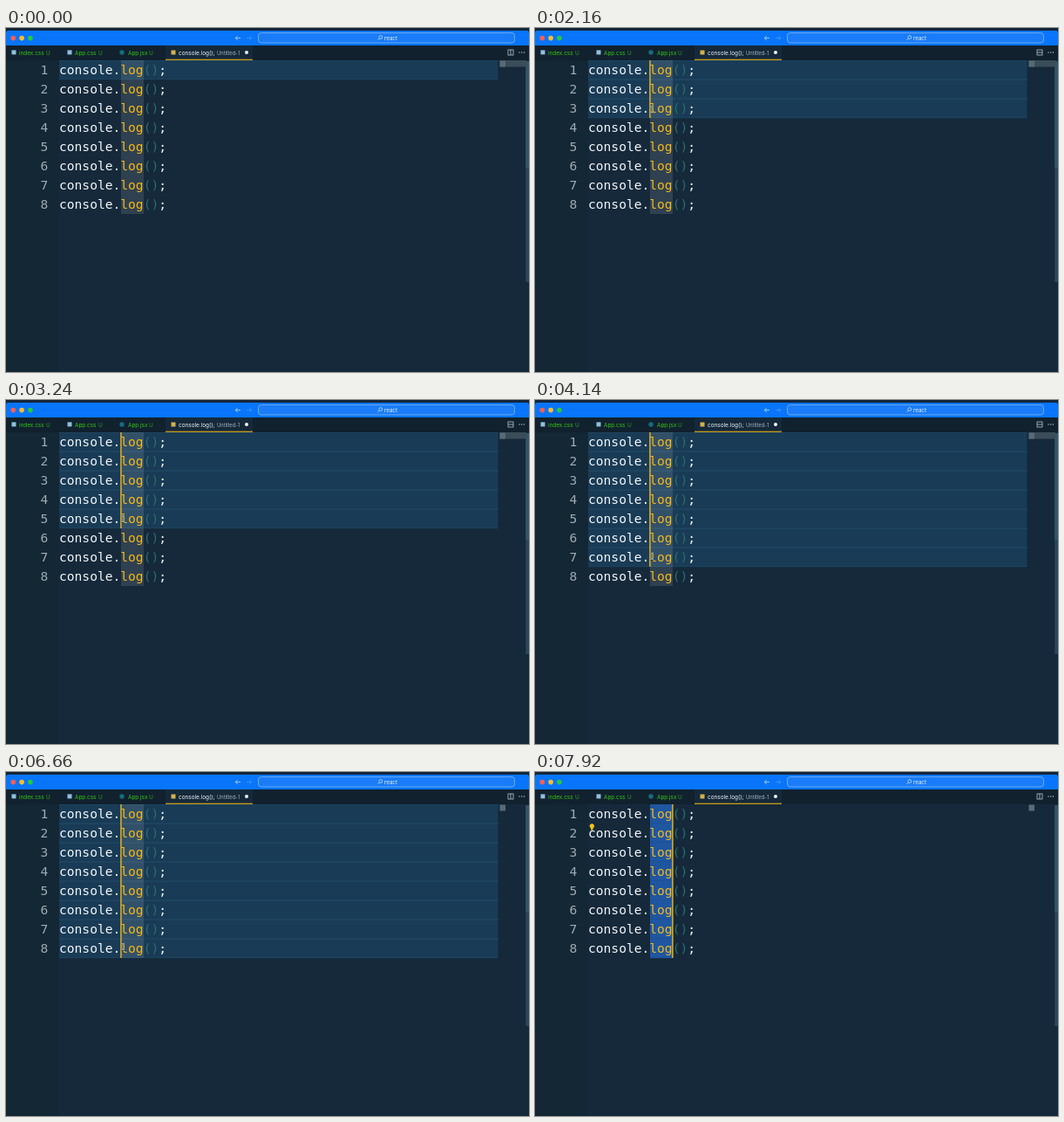
Animation of 600 by 394 pixels, one loop 8000 ms. Source, as an HTML page:

```html
<!DOCTYPE html>
<html lang="en">
<head>
<meta charset="utf-8">
<title>Multiple cursors</title>
<style>
html, body { margin: 0; width: 100%; height: 100%; overflow: hidden; background: #15293b; }
svg { display: block; width: 100vw; height: 100vh; }
text { white-space: pre; }
.code { font: 14.6px "DejaVu Sans Mono", monospace; fill: #f4f7f8; }
.ui { font: 6.4px Inter, sans-serif; }
</style>
</head>
<body>
<svg id="stage" viewBox="0 0 600 394"></svg>
<script>
const LOOP = 8000, ROWS = 8, TOP = 37, ROW = 22;
const TEXT_X = 61, WORD_X = 132, WORD_END = 158;
const CLICKS = [1300, 1640, 2110, 2700, 3180, 3650, 4130, 4600];
const MOUSE_IN = 900, ALT_DOWN = 900, ALT_UP = 5400;
const SLIDER_OUT = 4300, SELECT = 7460, BULB = 7700;
const NS = 'http://www.w3.org/2000/svg';
const stage = document.getElementById('stage');

function add(tag, attrs, parent = stage) {
  const el = document.createElementNS(NS, tag);
  for (const key in attrs) el.setAttribute(key, attrs[key]);
  parent.appendChild(el);
  return el;
}
const rect = (x, y, width, height, fill, more, parent) =>
  add('rect', { x, y, width, height, fill, ...more }, parent);
const dot = (cx, cy, r, fill, parent) => add('circle', { cx, cy, r, fill }, parent);
const line = (d, stroke, width = 0.8, parent) =>
  add('path', { d, stroke, 'stroke-width': width, fill: 'none' }, parent);
function label(x, y, str, fill, more) {
  add('text', { x, y, fill, class: 'ui', ...more }).textContent = str;
}
const show = (el, on) => el.setAttribute('visibility', on ? 'visible' : 'hidden');
const clamp = v => Math.max(0, Math.min(1, v));
const ease = v => { v = clamp(v); return v * v * (3 - 2 * v); };

function drawTitleBar() {
  rect(0, 0, 600, 8, '#142639');
  rect(0, 3, 600, 17.5, '#0875fb', { rx: 2.5 });
  rect(0, 10, 600, 10, '#0875fb');
  ['#ff5f57', '#febc2e', '#28c840'].forEach((c, i) => dot(8.3 + i * 9.8, 11.6, 2.8, c));
  line('M269 11.6H263.3M265.8 9.1L263.3 11.6L265.8 14.1', '#c3dcff');
  line('M276 11.6H281.7M279.2 9.1L281.7 11.6L279.2 14.1', '#4c98f8');
  rect(289.5, 5.6, 294, 11.4, '#1a7cf8', { rx: 3, stroke: '#82b7fb', 'stroke-width': 0.8 });
  add('circle', { cx: 429.8, cy: 10.6, r: 1.9, fill: 'none', stroke: '#d9e9ff', 'stroke-width': 0.7 });
  line('M428.4 12L426.4 14', '#d9e9ff', 0.7);
  label(434, 13.5, 'react', '#eef5ff', { style: 'font-size:6.2px' });
}

function drawTabs() {
  rect(0, 20, 600, 17, '#11212e');
  rect(183, 20, 100, 17, '#15293b');
  rect(183, 35.7, 100, 1.2, '#d9a514');
  const tabs = [[15, 46, 'index.css'], [79, 106, 'App.css'], [140, 164, 'App.jsx']];
  for (const [x, mark, name] of tabs) {
    label(x, 30.6, name, '#35c914');
    label(mark, 30.6, 'U', '#2ba51a');
  }
  rect(6.5, 25.4, 5, 5, '#8fbfdd');
  rect(70.5, 25.4, 5, 5, '#8fbfdd');
  dot(133, 28, 2.7, '#176b80');
  rect(189.5, 25.5, 5, 5, '#d5b04b');
  label(198, 30.6, 'console.log();', '#f2f5f7');
  label(242, 30.6, 'Untitled-1', '#a7b3bc', { style: 'font-size:5.8px' });
  dot(276, 28, 2, '#f4f6f7');
  [589, 591.7, 594.4].forEach(x => dot(x, 28, 0.7, '#b8c3ca'));
}

function drawCode() {
  const parts = [['console.', '#f4f7f8'], ['log', '#f6b91a'], ['()', '#2a6d70'], [';', '#f4f7f8']];
  for (let i = 0; i < ROWS; i++) {
    const y = TOP + 16.2 + i * ROW;
    add('text', { x: 48.3, y, class: 'code', 'text-anchor': 'end', style: 'fill:#a0abb1' })
      .textContent = i + 1;
    const t = add('text', { x: TEXT_X, y, class: 'code' });
    for (const [str, color] of parts) {
      add('tspan', { style: 'fill:' + color }, t).textContent = str;
    }
  }
}

rect(0, 0, 600, 394, '#15293b');
rect(0, TOP, 61, 357, '#132735');
drawTitleBar();
drawTabs();

const active = [];
for (let i = 0; i < ROWS; i++) {
  const g = add('g', {}), y = TOP + i * ROW;
  rect(TEXT_X, y, 503.5, ROW, '#193b56', {}, g);
  line(`M${TEXT_X} ${y + 0.5}H564.5M${TEXT_X} ${y + ROW - 0.3}H564.5`, '#1f4662', 0.9, g);
  active.push(g);
}

const wordMarks = rect(WORD_X, TOP, WORD_END - WORD_X, ROWS * ROW, '#fff', { 'fill-opacity': 0.11 });
const selection = add('g', {});
for (let i = 0; i < ROWS; i++) {
  rect(WORD_X, TOP + i * ROW, WORD_END - WORD_X, ROW, '#1f56a0', {}, selection);
  line(`M${WORD_X} ${TOP + (i + 1) * ROW}H${WORD_END}`, '#1b4a88', 0.8, selection);
}

drawCode();

const carets = [];
for (let i = 0; i < ROWS; i++) {
  carets.push(rect(WORD_X - 0.8, TOP + i * ROW, 1.4, ROW, '#efb71c'));
}

const bulb = add('g', {});
dot(65.3, 61.8, 2.6, '#f8c21c', bulb);
rect(64.1, 63.6, 2.4, 3, '#f8c21c', {}, bulb);

const splitIcon = add('g', {});
rect(576, 25, 6, 6, 'none', { stroke: '#b8c3ca', 'stroke-width': 0.8 }, splitIcon);
const splitRight = line('M579 25V31', '#b8c3ca', 0.8, splitIcon);
const splitDown = line('M576 28H582', '#b8c3ca', 0.8, splitIcon);

const slider = rect(566.5, 37, 30.5, 7.5, '#3b4d59');
rect(566.5, 37.5, 6.5, 7, '#586a76');
rect(596.3, 38, 3.7, 253, '#2b485a');
rect(596.3, 38, 3.7, 122, '#355566');

const mouse = add('g', {});
const beam = 'M-2 -4Q0 -4 0 -2.6Q0 -4 2 -4M0 -2.6V2.6M-2 4Q0 4 0 2.6Q0 4 2 4';
line(beam, '#1b2d3a', 1.8, mouse);
line(beam, '#dfe5e8', 0.8, mouse);

const rowY = n => 29.3 + 21.35 * n;

function mousePos(t) {
  const k = ease((t - MOUSE_IN) / 480);
  let x = 330 + (134 - 330) * k;
  let y = 262 + (rowY(2) - 262) * k;
  for (let n = 3; n <= ROWS; n++) {
    y += 21.35 * ease((t - CLICKS[n - 1] + 320) / 300);
  }
  return [x, y];
}

function update(t) {
  const selected = t >= SELECT;
  const count = Math.max(1, CLICKS.filter(c => c <= t).length);
  const since = t - (selected ? SELECT : CLICKS[count - 1]);
  const lit = (Math.floor(since / 500) & 1) === 0;

  active.forEach((g, i) => show(g, !selected && i < count));
  carets.forEach((c, i) => {
    c.setAttribute('x', (selected ? WORD_END : WORD_X) - 0.8);
    show(c, lit && i < count);
  });
  show(wordMarks, !selected);
  show(selection, selected);
  show(bulb, t >= BULB);

  const alt = t >= ALT_DOWN && t < ALT_UP;
  show(splitDown, alt);
  show(splitRight, !alt);
  slider.setAttribute('opacity', 1 - clamp((t - SLIDER_OUT) / 300));

  const [x, y] = mousePos(t);
  mouse.setAttribute('transform', `translate(${x} ${y})`);
  show(mouse, t >= MOUSE_IN && !selected);
}

const start = performance.now();
function frame() {
  update((performance.now() - start) % LOOP);
  requestAnimationFrame(frame);
}
frame();
</script>
</body>
</html>
```
